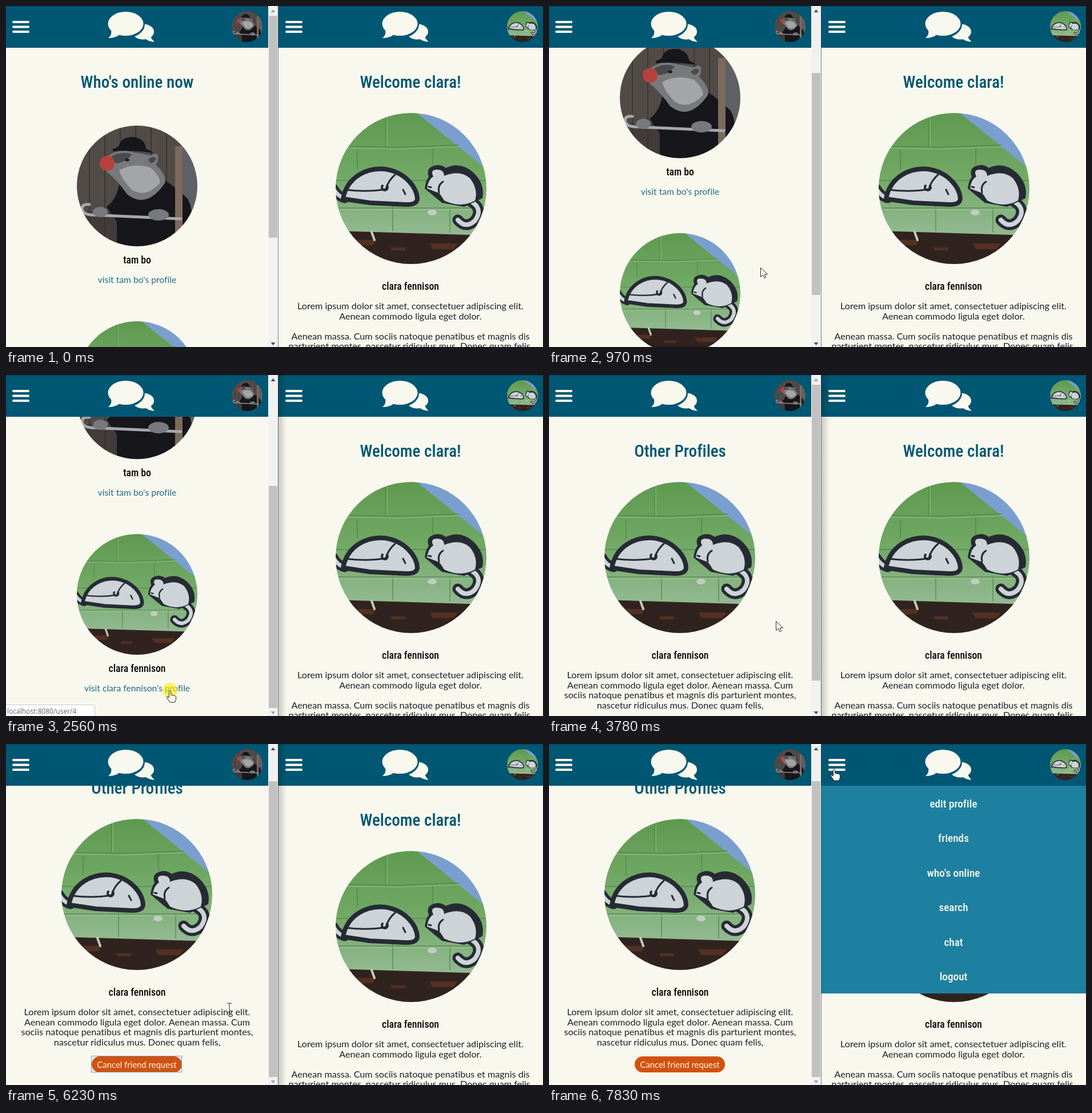
These frames come from a looping animation (940 px wide and 596 px high, 8 s). An HTML page with a canvas:

```html
<!DOCTYPE html>
<html lang="en">
<head>
<meta charset="utf-8">
<title>Friend request</title>
<style>
  html, body { margin: 0; width: 100%; height: 100%; overflow: hidden; }
  body { position: relative; background: #f9f8ee; color: #1a2028; font-family: Lato, "Open Sans", sans-serif; font-variant-ligatures: none; }
  body * { position: absolute; box-sizing: border-box; }
  .pane { top: 0; height: 596px; overflow: hidden; background: #f9f8ee; }
  #left { left: 0; width: 459px; }
  #right { left: 476px; width: 464px; }
  .page { inset: 0; }
  header { left: 0; top: 0; width: 100%; height: 73px; background: #005773; box-shadow: inset 0 1px #00425a; }
  header svg { left: 0; top: 0; fill: #f9f8ee; }
  canvas { border-radius: 50%; }
  .t { left: 0; width: 100%; height: 40px; margin-top: -20px; line-height: 40px; text-align: center; white-space: nowrap; top: calc(var(--y) * 1px); font-size: var(--body); }
  .title, .name, .item { font-family: var(--face); font-weight: 500; font-stretch: 62.5%; }
  .title { font-size: var(--big); color: #005773; }
  .name { font-size: calc(var(--big) * .61); color: #08090a; }
  .item { font-size: calc(var(--big) * .66); color: #f9f8ee; }
  .link { font-size: calc(var(--body) * .97); color: #22698a; }
  #button { left: 150px; top: 602px; width: 158px; height: 28px; border-radius: 14px; color: #f9f8ee; }
  #button .t { --y: 14; font-size: calc(var(--body) * .92); }
  #focus { left: 149px; top: 601px; width: 159px; height: 29px; border: 1px solid #5a9fdc; }
  #menu { left: 0; top: 73px; width: 100%; overflow: hidden; background: #1e80a0; }
  #status { left: -1px; top: 576px; width: 157px; height: 21px; padding-left: 2px; border: 1px solid #c9c9c9; border-radius: 0 4px 0 0; background: #fff; color: #606468; font: 12px/22px "Open Sans", sans-serif; white-space: nowrap; }
  #bar { left: 459px; top: 0; width: 17px; height: 596px; background: #f1f1f1; }
  #thumb { left: 1px; width: 15px; background: #c1c1c1; }
  #bar svg { left: 0; top: 0; }
  #edge { left: 476px; top: 0; width: 1px; height: 596px; background: #3c464bb0; }
  #shadow { left: 476px; top: 0; width: 15px; height: 596px; background: linear-gradient(90deg, #0003, #0000); }
  #glow { width: 26px; height: 26px; margin: -13px; border-radius: 50%; background: #fff000a0; }
  #cursor { left: 0; top: 0; width: 20px; height: 24px; overflow: visible; stroke: #222; }
</style>
</head>
<body>
<div class="pane" id="left">
  <div class="page" id="online">
    <div class="t title" style="--y:133">Who's online now</div>
    <canvas data-art="rat" data-box="229,314,211"></canvas>
    <div class="t name" style="--y:444">tam bo</div>
    <div class="t link" style="--y:478">visit tam bo's profile</div>
    <canvas data-art="mice" data-box="229,656,211"></canvas>
    <div class="t name" style="--y:786">clara fennison</div>
    <div class="t link" style="--y:820">visit clara fennison's profile</div>
  </div>
  <div class="page" id="profile">
    <div class="t title" style="--y:133">Other Profiles</div>
    <canvas data-art="mice" data-box="229,319,264"></canvas>
    <div class="t name" style="--y:490">clara fennison</div>
    <div class="t" style="--y:524">Lorem ipsum dolor sit amet, consectetuer adipiscing elit.</div>
    <div class="t" style="--y:542">Aenean commodo ligula eget dolor. Aenean massa. Cum</div>
    <div class="t" style="--y:559">sociis natoque penatibus et magnis dis parturient montes,</div>
    <div class="t" style="--y:577">nascetur ridiculus mus. Donec quam felis,</div>
    <div id="button"><div class="t" id="label"></div></div>
    <div id="focus"></div>
  </div>
  <header>
    <svg class="icons" width="300" height="73"></svg>
    <canvas data-art="rat" data-box="422,36,54"></canvas>
  </header>
  <div id="status">localhost:8080/user/4</div>
</div>
<div id="bar">
  <div id="thumb"></div>
  <svg width="17" height="596"><path id="up" d="M4.500 11l4-5 4 5z"/><path id="down" d="M4.500 588l4 5 4-5z"/></svg>
</div>
<div class="pane" id="right">
  <div class="t title" style="--y:133">Welcome clara!</div>
  <canvas data-art="mice" data-box="233,319,264"></canvas>
  <div class="t name" style="--y:490">clara fennison</div>
  <div class="t" style="--y:524">Lorem ipsum dolor sit amet, consectetuer adipiscing elit.</div>
  <div class="t" style="--y:542">Aenean commodo ligula eget dolor.</div>
  <div class="t" style="--y:577">Aenean massa. Cum sociis natoque penatibus et magnis dis</div>
  <div class="t" style="--y:594">parturient montes, nascetur ridiculus mus. Donec quam felis,</div>
  <div id="menu"></div>
  <header>
    <svg class="icons" width="300" height="73"></svg>
    <canvas data-art="mice" data-box="428,36,54"></canvas>
  </header>
</div>
<div id="edge"></div>
<div id="shadow"></div>
<div id="glow"></div>
<svg id="cursor"><path/></svg>

<script>
const $ = id => document.getElementById(id);
const root = document.documentElement.style;

// Type: pick the narrowest display face, then size each face by a sample line.
function measure(text, family, weight) {
  const span = document.createElement('span');
  span.textContent = text;
  span.style.cssText = `font:${weight} 100px ${family};font-stretch:62.5%;white-space:nowrap;visibility:hidden`;
  document.body.append(span);
  const w = span.getBoundingClientRect().width;
  span.remove();
  return w;
}
const sample = "Who's online now";
const faces = ['Roboto Condensed', 'Open Sans Condensed', 'Liberation Sans Narrow', 'Noto Sans', 'Open Sans', 'Roboto']
  .map(name => `"${name}", sans-serif`)
  .map(face => ({ face, w: measure(sample, face, 500) }))
  .sort((a, b) => a.w - b.w);
root.setProperty('--face', faces[0].face);
root.setProperty('--big', Math.min(36, 198 / faces[0].w * 100) + 'px');
const lorem = 'Lorem ipsum dolor sit amet, consectetuer adipiscing elit.';
root.setProperty('--body', 396 / measure(lorem, 'Lato, "Open Sans", sans-serif', 400) * 100 + 'px');

// Header icons: menu bars and speech bubbles.
document.querySelectorAll('.icons').forEach((svg, i) => {
  const bars = [26, 34.500, 43].map(y => `<rect x="${11 + i * 2}" y="${y}" width="30" height="4" rx="2"/>`).join('');
  svg.innerHTML = `${bars}<g transform="translate(${i * 4})">
    <ellipse cx="240" cy="45" rx="19" ry="13.500"/><path d="M253 53q2 6 7 9.500q-9 0-16-5z"/>
    <ellipse cx="209.500" cy="32" rx="33.500" ry="24" fill="#005773"/>
    <ellipse cx="209.500" cy="31" rx="31" ry="21"/><path d="M184 43q2 7-5 13q11 0 19-5z"/></g>`;
});

// Flat pictures, drawn in a 264 unit square.
function painter(c) {
  return {
    fill(color, d) { c.fillStyle = color; c.fill(new Path2D(d)); },
    line(color, width, d) { c.strokeStyle = color; c.lineWidth = width; c.stroke(new Path2D(d)); },
    dot(color, x, y, rx, ry = rx) { c.fillStyle = color; c.beginPath(); c.ellipse(x, y, rx, ry, 0, 0, 7); c.fill(); }
  };
}
const art = {
  mice(c) {
    const p = painter(c), ink = '#262b33', pale = '#cdd4d8';
    const wall = c.createLinearGradient(0, 0, 0, 210);
    wall.addColorStop(0, '#5f994f');
    wall.addColorStop(.5, '#70a864');
    wall.addColorStop(1, '#92b991');
    c.fillStyle = wall;
    c.fillRect(0, 0, 264, 264);
    p.fill('#7a9fcf', 'M142 0H264V98z');
    p.line('#4b80408c', 2, 'M0 58L110 60L215 56M88 0V58M38 66V98M170 62V92M0 118H264M100 164V206M200 165V208M0 166H264');
    p.line('#a5cf9c80', 1.5, 'M0 61L110 63L215 59M90 0V58M0 169H264');
    p.fill('#30231f', 'M0 206L264 214V264H0z');
    p.fill('#533022', 'M30 222h40l-4 9H34zM164 228h50l-8 10h-36zM96 235h26v5H98z');
    p.line(ink, 17, 'M-4 132Q4 146 16 149');
    p.line(pale, 7, 'M-4 132Q4 146 16 149');
    const body = 'M13 150C20 112 54 95 86 98C122 103 142 130 143 150Q142 161 122 160L60 157z';
    p.fill(pale, body);
    p.line(ink, 8, body);
    p.line(ink, 3, 'M17 134Q56 139 88 133Q92 118 104 108M118 134l4 8');
    p.line(ink, 4, 'M82 127a5 5 0 1 0 8 0');
    p.line(ink, 19, 'M234 153Q260 166 244 188Q228 203 214 187');
    p.line(pale, 8, 'M234 153Q260 166 244 188Q228 203 214 187');
    p.fill(ink, 'M156 132Q158 117 163 112Q158 97 170 93Q182 88 193 96Q218 84 241 104Q262 124 257 149L225 164L186 157z');
    p.fill(pale, 'M160 132Q162 116 171 111Q165 99 177 99Q190 99 190 110Q218 99 235 114Q250 133 244 153Q219 167 190 153Q184 143 181 140z');
    p.line(ink, 3, 'M181 139Q178 126 188 120M163 129l4 1');
    p.dot('#c4cbc2', 169, 174, 8, 5);
    p.line('#bfd0ba', 4, 'M63 208l5 14');
  },
  rat(c) {
    const p = painter(c), black = '#16161b', fur = '#77797c';
    c.scale(264 / 211, 264 / 211);
    p.fill('#514b48', 'M0 0H211V211H0z');
    p.fill('#433b39', 'M0 150H211V211H0z');
    for (let x = 22; x < 170; x += 27) p.line('#352f2e', 1.5, `M${x} 0V211`);
    p.fill('#5e6066', 'M185 0H211V211H185z');
    p.fill(black, 'M76 92Q72 128 52 142L70 168V211H182Q212 160 194 128Q172 106 148 92z');
    p.fill('#7c6a5c', 'M172 36H185V211H172z');
    p.fill(fur, 'M46 60Q60 46 80 43L130 52Q143 44 142 57Q142 66 138 68Q158 88 154 101Q121 147 88 120Q72 97 52 80z');
    p.fill('#a3a5a6', 'M74 78Q100 64 130 74Q146 90 146 100Q120 128 96 112Q78 94 74 78z');
    p.fill('#494a4e', 'M60 54Q78 44 96 50Q88 64 68 66zM124 60Q134 50 139 58Q136 64 130 66z');
    p.fill(black, 'M63 41Q74 38 75 32Q79 20 98 20Q119 22 121 40L135 48Q96 42 63 45z');
    p.dot('#1c1c20', 88, 60, 4, 2.5);
    p.dot('#b8403f', 53, 66, 13);
    p.line('#a5a9ac', 5, 'M22 138q-13-2-13 8q2 9 16 10L182 163');
    p.dot(fur, 41, 151, 13, 9);
    p.dot(fur, 143, 156, 18, 10);
  }
};
document.querySelectorAll('canvas').forEach(el => {
  const [x, y, size] = el.dataset.box.split(',').map(Number);
  el.width = el.height = size;
  el.style.left = x - size / 2 + 'px';
  el.style.top = y - size / 2 + 'px';
  const c = el.getContext('2d');
  c.lineJoin = c.lineCap = 'round';
  c.scale(size / 264, size / 264);
  art[el.dataset.art](c);
});

['edit profile', 'friends', "who's online", 'search', 'chat', 'logout'].forEach((text, i) => {
  const item = document.createElement('div');
  item.className = 't item';
  item.textContent = text;
  item.style.setProperty('--y', 31.500 + i * 60.500);
  $('menu').append(item);
});

const ticks = [0, 200, 390, 585, 780, 970, 1140, 1360, 1570, 1770, 1980, 2180, 2390, 2560, 2790, 2990, 3190, 3380,
  3620, 3780, 4030, 4210, 4400, 4610, 4800, 5000, 5200, 5610, 5790, 6230, 6430, 6590, 6860, 7050, 7240, 7440, 7640, 7830];
const pointers = {
  arrow: 'M.5 .5V16.500l4-3.600 2.400 5.600 2.600-1.100-2.400-5.400h5.400z',
  hand: 'M-1.500 2q1.500-3 3 0v6l7 1.500q2 .5 2 2.500v4l-2 5H0l-5.500-8q-1-2.500 1.500-2l2.500 2z',
  beam: 'M-4-8h3l1 1 1-1h3M0-7V8M-4 9h3l1-1 1 1h3'
};
const path = [
  [200, 404, 575], [585, 370, 457], [1360, 370, 457], [2390, 287, 551], [2790, 287, 551], [3380, 372, 460],
  [3780, 397, 430], [4030, 397, 430], [4210, 397, 434], [4610, 390, 446], [5200, 274, 561], [5790, 274, 561],
  [6230, 391, 461], [6590, 547, 281], [7240, 499, 43]
];
const onlineScroll = [[390, 0], [585, 25], [970, 154], [1140, 273]];
const profileScroll = [[3780, 0], [4210, 56]];
const menuHeight = [[7440, 0], [7640, 190], [7830, 363]];

function track(keys, t, n = 1) {
  const i = keys.findIndex(k => k[0] > t);
  if (i === 0) return keys[0][n];
  if (i < 0) return keys[keys.length - 1][n];
  const a = keys[i - 1], b = keys[i];
  return a[n] + (b[n] - a[n]) * (t - a[0]) / (b[0] - a[0]);
}
const within = (t, ...spans) => spans.some(([a, b]) => t >= a && t < b);
const show = (id, on) => { $(id).style.visibility = on ? 'visible' : 'hidden'; };

function draw(now) {
  const time = now % 8000;
  const t = ticks.filter(k => k <= time).pop();

  const profile = t >= 2990;
  const scroll = Math.round(track(profile ? profileScroll : onlineScroll, t));
  const end = profile ? 56 : 273;
  const size = profile ? 517 : 388;
  $('online').style.display = profile ? 'none' : 'block';
  $('profile').style.display = profile ? 'block' : 'none';
  $(profile ? 'profile' : 'online').style.transform = `translateY(${-scroll}px)`;
  $('thumb').style.height = size + 'px';
  $('thumb').style.top = Math.round(17 + scroll / end * (565 - size)) + 'px';
  $('up').style.fill = scroll ? '#505050' : '#a3a3a3';
  $('down').style.fill = scroll < end ? '#505050' : '#a3a3a3';

  const sent = t >= 5790;
  $('label').textContent = sent ? 'Cancel friend request' : 'Make friend request';
  $('button').style.background = sent ? '#d2520c' : '#265072';
  $('focus').style.display = within(t, [5610, 7440]) ? 'block' : 'none';
  show('status', within(t, [2180, 2990]));
  show('shadow', within(t, [2560, 7440]));
  $('menu').style.height = track(menuHeight, t) + 'px';

  const x = track(path, t, 1), y = track(path, t, 2);
  const shape = within(t, [2180, 2990], [5000, 6230], [7240, 8000]) ? 'hand' : within(t, [6230, 6430]) ? 'beam' : 'arrow';
  const pointer = $('cursor').firstElementChild;
  pointer.setAttribute('d', pointers[shape]);
  pointer.setAttribute('fill', shape === 'beam' ? 'none' : '#fff');
  $('cursor').style.transform = `translate(${Math.round(x)}px, ${Math.round(y)}px)`;
  show('cursor', t >= 200);
  $('glow').style.transform = `translate(${x}px, ${y}px)`;
  show('glow', within(t, [2560, 2990], [5610, 5790], [7440, 7640]));
}

const start = performance.now();
function loop() {
  draw(performance.now() - start);
  requestAnimationFrame(loop);
}
draw(0);
requestAnimationFrame(loop);
</script>
</body>
</html>
```
